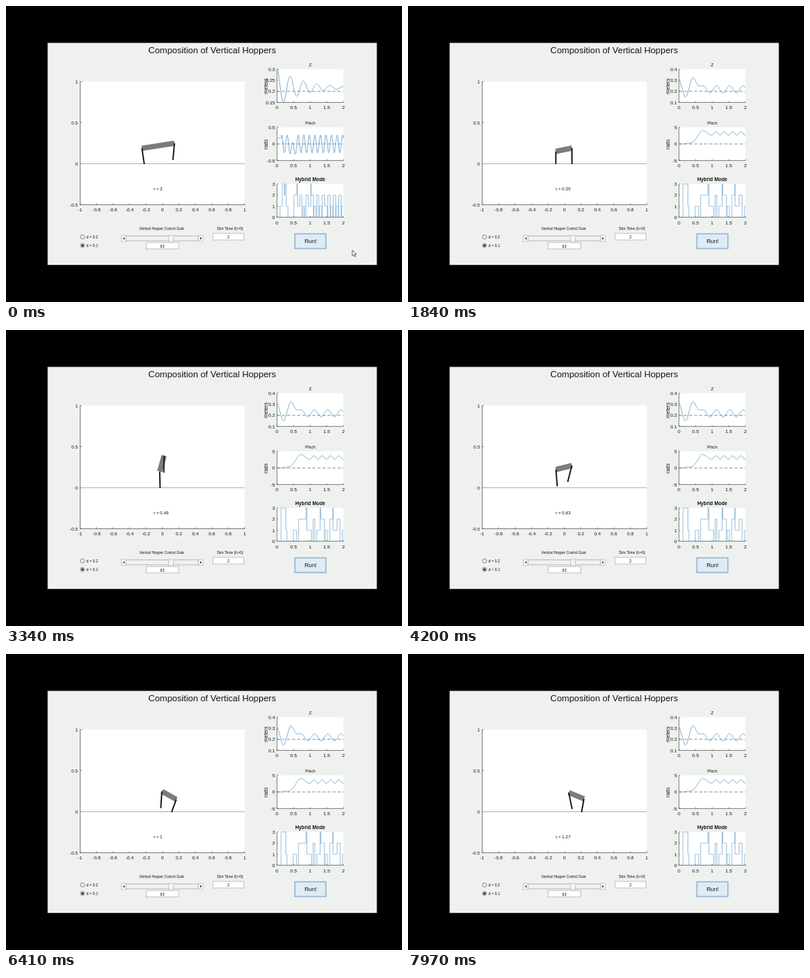
An HTML page that plays this animation: 510x382 px, repeating every 8000 ms.

```html
<!DOCTYPE html>
<html lang="en">
<head>
<meta charset="utf-8">
<title>Vertical hoppers</title>
<style>
html, body { margin: 0; width: 100%; height: 100%; overflow: hidden; background: #000; }
svg { display: block; width: 100vw; height: 100vh; }
text { font-family: "Liberation Sans", Arial, sans-serif; fill: #141414; }
.curve { fill: none; stroke: #5b9ac8; stroke-width: .75; }
.steps { fill: none; stroke: #6ba3cc; stroke-width: .65; }
.axis { fill: none; stroke: #555; stroke-width: .7; }
.dash { stroke: #5f7488; stroke-width: .75; stroke-dasharray: 4 2.5; }
.field { fill: #fff; stroke: #b0b0b0; stroke-width: .7; }
</style>
</head>
<body>
<svg id="stage" viewBox="0 0 510 382"></svg>
<script>
const LOOP = 8000, START = 240, FLOOR = 204, UNIT = 106, LEG = 21.7, TAU = 2 * Math.PI;
const stage = document.getElementById('stage');

function add(tag, attrs, parent = stage) {
  const el = document.createElementNS('http://www.w3.org/2000/svg', tag);
  for (const k in attrs) el.setAttribute(k, attrs[k]);
  parent.appendChild(el);
  return el;
}
function label(s, x, y, size, anchor = 'middle', extra = {}, parent = stage) {
  const el = add('text', { x, y, 'font-size': size, 'text-anchor': anchor, ...extra }, parent);
  el.textContent = s;
  return el;
}
const rect = (x, y, width, height, attrs) => add('rect', { x, y, width, height, ...attrs });
const path = (d, attrs, parent) => add('path', { d, ...attrs }, parent);

const clamp = u => Math.min(1, Math.max(0, u));
const wave = (t, peak, period) => Math.cos(TAU * (t - peak) / period);
// Smooth move from a at t0 to b at t1; a higher power starts later.
function ease(t, t0, t1, a, b, power = 1) {
  const u = clamp((t - t0) / (t1 - t0)) ** power;
  return a + (b - a) * u * u * (3 - 2 * u);
}

// The running simulation: one fall and rebound, a flip, then a steady rocking hop.
const sim = {
  half: .1,
  z(t) {
    if (t < .195) return ease(t, 0, .195, .3, .148);
    if (t < .42) return ease(t, .195, .42, .148, .322);
    if (t < .75) return ease(t, .42, .6, .322, .25);
    return .218 + .032 * wave(t, 1.13, .4);
  },
  pitch(t) {
    if (t < .25) return .2 * ease(t, .1, .25, 0, 1);
    if (t < .71) return ease(t, .25, .71, .2, 4.05, 1.6);
    if (t < .99) return ease(t, .71, .99, 4.05, 2.61);
    return Math.PI - .53 * wave(t, .99, .25);
  },
  x: t => 200.8 + 25 * Math.max(0, t - .63),
  swings(t) {
    const gain = clamp((t - .45) * 6);
    return [gain * (4 * wave(t, .83, .34) - 2), gain * (3 * wave(t, .75, .5) + 1.5)];
  }
};

// The finished run that is on screen at the start.
const last = {
  half: .2,
  z: t => Math.min(.3, .217 + .09 * Math.exp(-1.4 * t) * wave(t, 0, .4)),
  pitch: t => t < .14 ? .18 : .27 * wave(t, .14, .167) - .22 * Math.exp(-(((t - .48) / .06) ** 2)),
  x: () => 196,
  swings: () => [3, -2]
};

// Sum of 1 and 2 for each end that is low enough for its foot to touch.
function mode({ z, pitch, half }, t) {
  const rise = half * Math.sin(pitch(t)), reach = LEG / UNIT;
  return (z(t) - rise < reach ? 1 : 0) + (z(t) + rise < reach ? 2 : 0);
}

// Window and main axes
rect(53.6, 47.6, 424, 286.6, { fill: '#eff1ef' });
label('Composition of Vertical Hoppers', 265.5, 61, 11.5);
rect(95.5, 97.5, 212, 159, { fill: '#fff' });
path('M95.5 97.5V256.5H307.5', { class: 'axis' });
for (let i = 0; i <= 10; i++) {
  const x = 95.5 + i * 21.2;
  path(`M${x} 256.5v-2`, { class: 'axis' });
  label(String((i - 5) / 5), x, 265, 6);
}
for (let i = 0; i < 4; i++) {
  const y = 97.5 + i * 53;
  path(`M95.5 ${y}h2`, { class: 'axis' });
  label(String(1 - i / 2), 92.5, y + 2.2, 6, 'end');
}
path('M95.5 203.6H307.5', { stroke: '#8fb3ce', 'stroke-width': .9 });

// Side plots: shared frame, with a curve and tick labels for each run
const runs = [last, sim], groups = runs.map(() => add('g', {}));
const PX = 349, PW = 85.5, PH = 42.8;

function plot({ top, title, unit, ranges, parts, value, dash, steps }) {
  rect(PX, top, PW, PH, { fill: '#fff' });
  path(`M${PX} ${top}v${PH}h${PW}`, { class: 'axis' });
  label(title, 391.8, top - 3.4, steps ? 6.4 : 6, 'middle', steps ? { 'font-weight': 'bold' } : {});
  if (unit) label(unit, 0, 0, 6.6, 'middle', { transform: `translate(336.5 ${top + 22}) rotate(-90)` });
  for (let i = 0; i < 5; i++) {
    const x = PX + i * PW / 4;
    path(`M${x} ${top + PH}v-1.5`, { class: 'axis' });
    label(String(i / 2), x, top + PH + 9, 6.2);
  }
  if (dash) path(`M${PX} ${top + PH * dash}h${PW}`, { class: 'dash' });
  groups.forEach((g, r) => {
    stage.appendChild(g);
    const [lo, hi] = ranges[r];
    for (let i = 0; i <= parts; i++) {
      const y = top + i * PH / parts;
      path(`M${PX} ${y}h1.5`, { class: 'axis' }, g);
      label(String(+(hi - (hi - lo) * i / parts).toFixed(2)), PX - 2.5, y + 2.2, 6.2, 'end', {}, g);
    }
    let d = '';
    for (let i = 0; i <= 200; i++) {
      const x = (PX + PW * i / 200).toFixed(2);
      const y = (top + PH * (hi - value(runs[r], i / 100)) / (hi - lo)).toFixed(2);
      d += !i ? `M${x} ${y}` : steps ? `H${x}V${y}` : `L${x} ${y}`;
    }
    path(d, { class: steps ? 'steps' : 'curve' }, g);
  });
}
plot({ top: 81.6, title: 'Z', unit: 'meters', ranges: [[.15, .3], [.1, .4]], parts: 3,
  value: (run, t) => run.z(t), dash: 2 / 3 });
plot({ top: 156.6, title: 'Pitch', unit: 'rads', ranges: [[-.5, .5], [-5, 5]], parts: 2,
  value: (run, t) => run.pitch(t), dash: .5 });
plot({ top: 229.8, title: 'Hybrid Mode', ranges: [[0, 3], [0, 3]], parts: 3, value: mode, steps: true });

// Controls
['d = 0.2', 'd = 0.1'].forEach((s, i) => {
  const y = 298 + 11 * i;
  add('circle', { cx: 98.5, cy: y, r: 2.6, fill: '#fff', stroke: '#555', 'stroke-width': .7 });
  if (i) add('circle', { cx: 98.5, cy: y, r: 1.5, fill: '#111' });
  label(s, 103.5, y + 2, 4.8, 'start');
});
label('Vertical Hopper Control Gain', 200.5, 289, 4.5);
rect(154.5, 296.8, 93.5, 6.2, { fill: '#f1f1f1', stroke: '#a2a2a2', 'stroke-width': .7 });
for (const x of [148.5, 209.5, 248]) rect(x, 296, 6, 8, { fill: '#f3f4f3', stroke: '#b4b4b4', 'stroke-width': .6 });
path('M152.7 298.3v3.2l-2.2-1.6zM250 298.3v3.2l2.2-1.6z', { fill: '#333' });
rect(180.5, 305.2, 42, 8.5, { class: 'field' });
label('62', 201.5, 311.5, 5.2);
label('Sim Time (h>0)', 288.5, 289, 5);
rect(266.5, 293.2, 40, 8.8, { class: 'field' });
label('2', 286.5, 299.5, 5.2);
rect(372, 294, 40, 19, { fill: '#dfebf5', stroke: '#7fabd2', 'stroke-width': 1.2 });
label('Run!', 392.3, 306.3, 7.4);

// Moving parts
const body = path('', { stroke: '#7c7c7c', 'stroke-width': 6.8 });
const legs = [0, 1].map(() => path('', { stroke: '#111', 'stroke-width': 1.7 }));
const timeText = label('', 190.3, 238, 5.7, 'start');
const cursor = path('M446 315v7.5l1.8-1.6 1.3 2.8 1.2-.6-1.3-2.6h2.3z', { fill: '#fff', stroke: '#333', 'stroke-width': .7 });

function pose(run, t) {
  const cx = run.x(t), cy = FLOOR - run.z(t) * UNIT;
  const angle = run.pitch(t), half = run.half * UNIT, swings = run.swings(t);
  const ends = [-1, 1].map(s => [cx + s * half * Math.cos(angle), cy - s * half * Math.sin(angle)]);
  body.setAttribute('d', `M${ends[0]}L${ends[1]}`);
  ends.forEach(([x, y], i) => {
    const dx = swings[i], foot = Math.min(FLOOR, y + Math.sqrt(LEG * LEG - dx * dx));
    legs[i].setAttribute('d', `M${x} ${y}L${x + dx} ${foot}`);
  });
}

// Simulation time, in hundredths, speeding up slightly.
function simTime(ms) {
  const s = (ms - START) / 1000;
  return Math.floor(100 * (.0008 + .1558 * s + .00117 * s * s)) / 100;
}

function draw(ms) {
  const fresh = ms >= START, t = fresh ? simTime(ms) : 2;
  groups[0].style.display = cursor.style.display = fresh ? 'none' : '';
  groups[1].style.display = fresh ? '' : 'none';
  timeText.textContent = `t = ${t}`;
  pose(fresh ? sim : { ...last, pitch: () => .155 }, t);
}

function tick() {
  draw(performance.now() % LOOP);
  requestAnimationFrame(tick);
}
tick();
</script>
</body>
</html>
```
